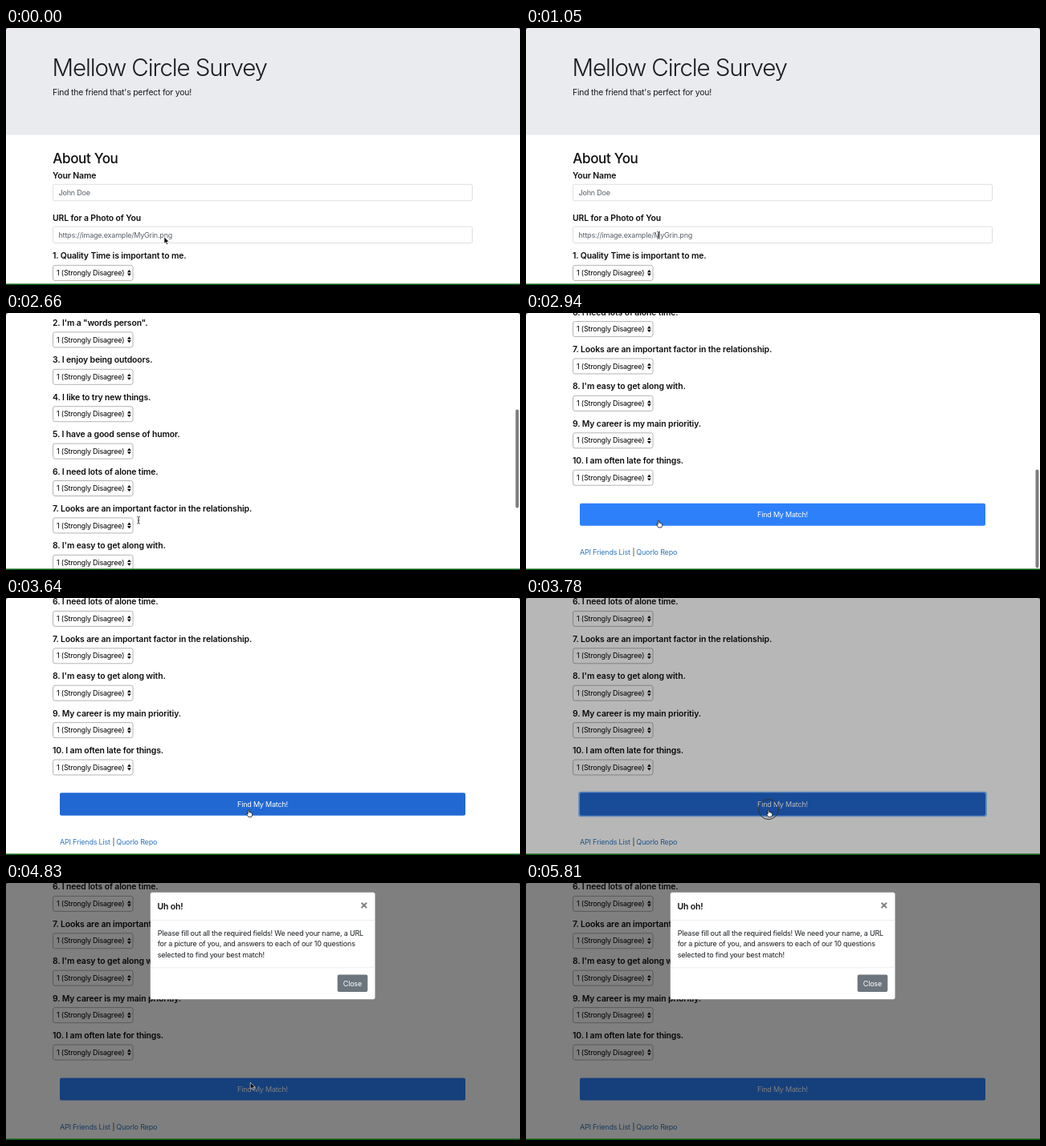
These frames come from a looping animation (640 px wide and 321 px high, 6.37 s). An HTML page:

```html
<!DOCTYPE html>
<html lang="en">
<head>
<meta charset="utf-8">
<title>Survey</title>
<style>
  html, body { margin: 0; width: 100%; height: 100%; overflow: hidden; background: #fff; }
  svg { display: block; width: 640px; height: 321px; }
  text {
    font-family: Inter, "Liberation Sans", sans-serif;
    font-optical-sizing: none;
    font-size: 9px; letter-spacing: -.022em; fill: #1a1d20; white-space: pre;
  }
  .title { font-size: 29.5px; font-weight: 300; letter-spacing: -.038em; }
  .lead { font-size: 10.4px; letter-spacing: -.019em; }
  .heading { font-size: 17px; font-weight: 500; letter-spacing: -.02em; fill: #0c0d0e; }
  .label { font-size: 10.4px; font-weight: 600; letter-spacing: -.01em; fill: #0c0d0e; }
  .hint { fill: #596067; }
  .option { fill: #000; }
  .link { fill: #2f76bd; }
  .light { fill: #fff; text-anchor: middle; }
  .cross { font-size: 15px; font-weight: 700; fill: #7d7d7d; text-anchor: middle; }
  .field { fill: #fff; stroke: #dcdfe2; }
  .select { fill: #fff; stroke: #b4b4b4; }
  .rule { fill: #e6e9ec; }
</style>
</head>
<body>
<svg viewBox="0 0 640 321">
  <rect width="640" height="321" fill="#fff"/>
  <g id="page"></g>
  <rect id="thumb" x="634.5" width="4" height="123" rx="2" fill="#7d7d7d"/>
  <rect id="shade" width="640" height="321" fill="#000"/>
  <g id="modal"></g>
  <path d="M0 0H3Q0 0 0 3ZM640 0H637Q640 0 640 3Z" fill="#444"/>
  <rect y="319.4" width="640" height="1.6" fill="#045c0a"/>
  <g id="pointer">
    <circle id="ring" r="12.5" fill="none" stroke="#333"/>
    <path id="arrow" d="M0 0V8.2L2 6.5L3 9.4L4.5 8.8L3.3 6H6Z" stroke="#fff" stroke-width=".6"/>
    <path id="beam" d="M-2 -4.2Q0 -4.2 0 -3V3.6Q0 4.8 -2 4.8M2 -4.2Q0 -4.2 0 -3V3.6Q0 4.8 2 4.8M-1 .8H1" fill="none" stroke="#444" stroke-width=".8"/>
    <path id="hand" d="M-.8 .8Q0 -.3 .8 .8V3.4L4.6 4.6V7L3.8 9.4H-.2L-2.6 5.6Q-2.4 4.6 -.8 5.8Z" fill="#fff" stroke="#111" stroke-width=".8"/>
  </g>
</svg>
<script>
const LOOP = 6370, STEP = 70, QUESTION_GAP = 46.4, LINE_GAP = 13.5;
const $ = id => document.getElementById(id);

function add(parent, tag, attrs, content = "") {
  const node = document.createElementNS("http://www.w3.org/2000/svg", tag);
  for (const name in attrs) node.setAttribute(name, attrs[name]);
  node.textContent = content;
  return parent.appendChild(node);
}
const text = (parent, x, y, cls, content) => add(parent, "text", { x, y, class: cls }, content);
const box = (parent, x, y, width, height, attrs) => add(parent, "rect", { x, y, width, height, ...attrs });

const questions = [
  "Quality Time is important to me.", "I'm a \"words person\".", "I enjoy being outdoors.",
  "I like to try new things.", "I have a good sense of humor.", "I need lots of alone time.",
  "Looks are an important factor in the relationship.", "I'm easy to get along with.",
  "My career is my main prioritiy.", "I am often late for things."
];
const message = [
  "Please fill out all the required fields! We need your name, a URL",
  "for a picture of you, and answers to each of our 10 questions",
  "selected to find your best match!"
];

const page = $("page"), modal = $("modal");

box(page, 0, 0, 640, 133.5, { fill: "#eaebef" });
text(page, 57.5, 60.3, "title", "Mellow Circle Survey");
text(page, 58, 84.3, "lead", "Find the friend that's perfect for you!");
text(page, 58.3, 168.7, "heading", "About You");

function field(y, label, hint) {
  text(page, 58, y, "label", label);
  box(page, 58.5, y + 7.5, 522, 20.5, { rx: 2, class: "field" });
  text(page, 65.5, y + 21.2, "hint", hint);
}
field(187.8, "Your Name", "John Doe");
field(240.5, "URL for a Photo of You", "https://image.example/MyGrin.png");

questions.forEach((question, i) => {
  const y = 288.4 + i * QUESTION_GAP;
  text(page, 58, y, "label", `${i + 1}. ${question}`);
  box(page, 58.5, y + 8, 99.5, 19, { rx: 2.5, class: "select" });
  text(page, 63, y + 20.6, "option", "1 (Strongly Disagree)");
  add(page, "path", { d: `M151 ${y + 16.8}l2.4 -3.2l2.4 3.2zm0 1.4l2.4 3.2l2.4 -3.2z` });
});

const focus = box(page, 65.2, 753.7, 508.6, 31.6, { rx: 3, fill: "#80bdff" });
box(page, 67, 755.5, 505, 28, { rx: 2, fill: "#2d80f9" });
const hover = box(page, 67, 755.5, 505, 28, { rx: 2, fill: "#2268d3" });
text(page, 319.5, 772.8, "light", "Find My Match!");
text(page, 67, 820.3, "link", "API Friends List");
text(page, 132.5, 820.3, "", "|");
text(page, 137.3, 820.3, "link", "Quorlo Repo");

box(modal, 179.8, 11.8, 279.7, 133.4, { rx: 2.5, fill: "#fff" });
text(modal, 188.5, 32.8, "label", "Uh oh!");
text(modal, 445.6, 33.4, "cross", "×");
box(modal, 180, 46, 279.5, .7, { class: "rule" });
message.forEach((line, i) => text(modal, 188.7, 65.8 + i * LINE_GAP, "", line));
box(modal, 180, 105.5, 279.5, .7, { class: "rule" });
box(modal, 412.7, 114.5, 37.6, 21.5, { rx: 2, fill: "#6c757d" });
text(modal, 431.4, 128.6, "light", "Close");

// Progress from 0 to 1 over a span of time, optionally eased.
const ramp = (t, from, to) => Math.min(1, Math.max(0, (t - from) / (to - from)));
const smooth = (t, from, to) => { const p = ramp(t, from, to); return p * p * (3 - 2 * p); };
const between = (t, from, to) => t >= from && t < to;
const set = (node, name, value) => node.setAttribute(name, value);
const show = (id, on) => { $(id).style.display = on ? "" : "none"; };

// A nudge, a long flick, then a rubber-band return from the page end.
function scrollAt(t) {
  const bounce = ramp(t, 2730, 2870) * (1 - ramp(t, 2870, 3430)) ** 2;
  return 2 * ramp(t, 1750, 1890) + 510 * smooth(t, 2162, 2870) ** 2 + 7.6 * bounce;
}

function pointerAt(t) {
  const toField = ramp(t, 630, 1050), toButton = smooth(t, 2940, 3430);
  const up = smooth(t, 4550, 4970), leave = ramp(t, 5320, 5810) ** 2;
  return [
    197 - 32 * toField + 137 * toButton + 3 * up + 27 * leave,
    261 - 2.5 * toField + 5.5 * toButton - 20 * up + 80 * leave
  ];
}

function draw(t) {
  const scroll = scrollAt(t);
  set(page, "transform", `translate(0 ${-scroll})`);
  set($("thumb"), "y", Math.min(195.5, Math.max(2, scroll * .3845 - 2)));
  set($("thumb"), "opacity", ramp(t, 1750, 1820) - ramp(t, 3220, 3500));

  set(hover, "opacity", ramp(t, 2940, 3080) - ramp(t, 3780, 3920));
  set(focus, "opacity", ramp(t, 3640, 3780) - ramp(t, 4200, 4480));

  set($("shade"), "opacity", .5 * ramp(t, 3690, 3850));
  set(modal, "opacity", ramp(t, 3840, 3990));
  set(modal, "transform", `translate(0 ${-33 * (1 - ramp(t, 3840, 4150)) ** 1.6})`);

  set($("pointer"), "transform", `translate(${pointerAt(t)})`);
  show("pointer", t < 5810);
  show("ring", between(t, 70, 280) || between(t, 3710, 3850));
  show("beam", between(t, 700, 2870));
  show("hand", between(t, 2870, 3850));
  show("arrow", !between(t, 700, 3850));
}

const start = performance.now();
function tick() {
  const t = (performance.now() - start) % LOOP;
  draw(Math.floor(t / STEP) * STEP);
  requestAnimationFrame(tick);
}
tick();
</script>
</body>
</html>
```
